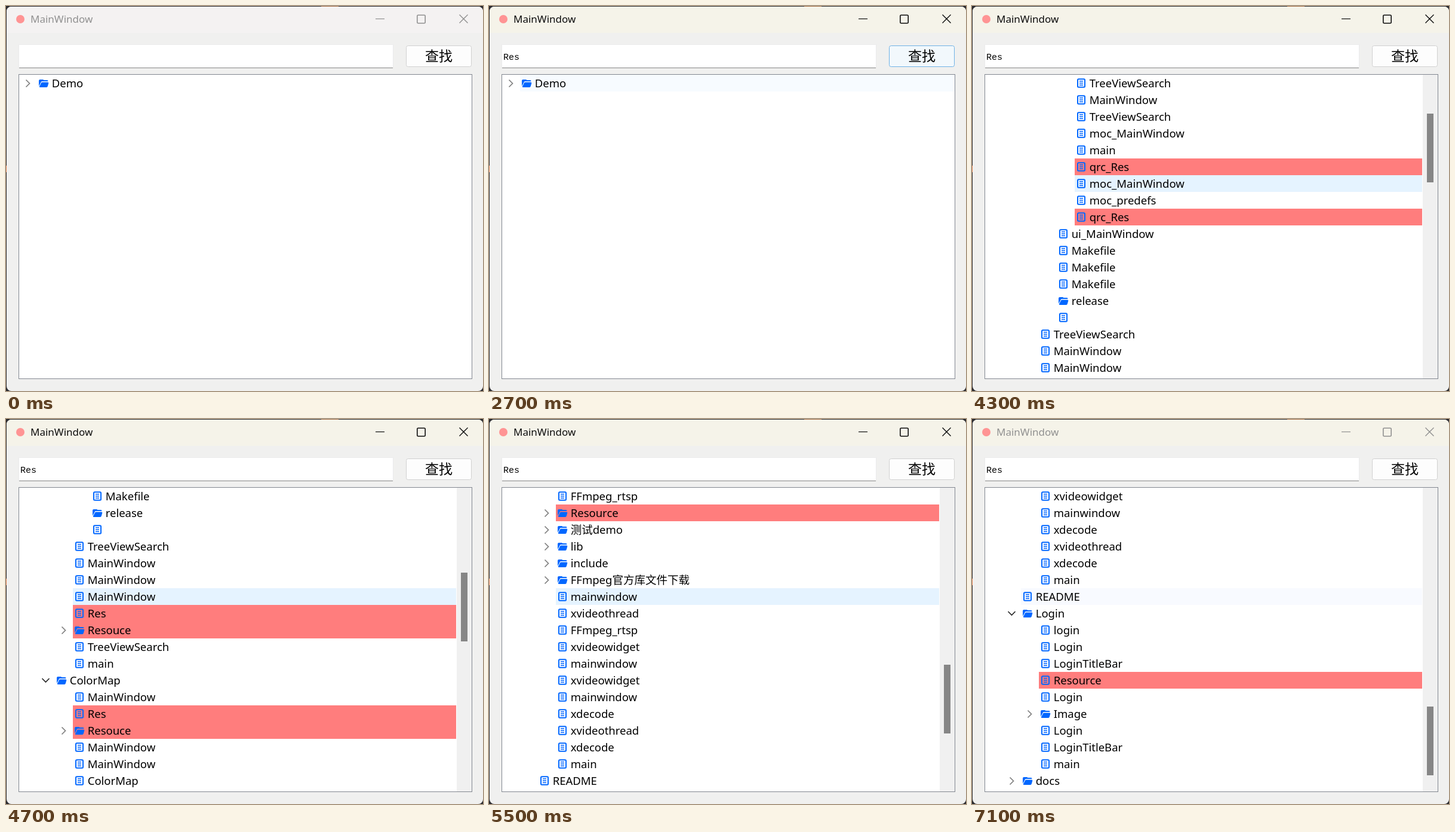
An HTML page that plays this animation: 799 px wide and 644 px high, repeating every 7.2 s.

```html
<!DOCTYPE html>
<html lang="zh">
<head>
<meta charset="utf-8">
<title>MainWindow</title>
<style>
html, body { margin: 0; width: 100%; height: 100%; overflow: hidden; background: #2a2a2e; }
svg { display: block; }
text { white-space: pre; }
.item { font: 18.5px "Noto Sans", "Noto Sans CJK SC", sans-serif; }
.title { font: 17px "Noto Sans", sans-serif; }
.query { font: 15px "Liberation Mono", monospace; }
.find { font: 300 23px "Noto Sans CJK SC", sans-serif; }
</style>
</head>
<body>
<svg id="stage" width="799" height="644" viewBox="0 0 799 644"></svg>
<script>
const LOOP = 7200, ROW = 28, TOP = 115, PAGE = 18;

// depth, kind (v open folder, > closed folder, = plain folder, - file), name
const tree = `0v Demo|1v TreeViewSearch|2v bin|3v debug
4- TreeViewSearch|4- TreeViewSearch|4- TreeViewSearch|4- MainWindow|4- TreeViewSearch
4- moc_MainWindow|4- main|4- qrc_Res|4- moc_MainWindow|4- moc_predefs|4- qrc_Res
3- ui_MainWindow|3- Makefile|3- Makefile|3- Makefile|3= release|3- 
2- TreeViewSearch|2- MainWindow|2- MainWindow|2- MainWindow|2- Res|2> Resouce
2- TreeViewSearch|2- main|1v ColorMap|2- MainWindow|2- Res|2> Resouce
2- MainWindow|2- MainWindow|2- ColorMap|2> CustomPlot|2- main
1v FFmpeg_rtsp|2> bin|2- mainwindow|2- Res|2- FFmpeg_rtsp|2> Resource
2> 测试demo|2> lib|2> include|2> FFmpeg官方库文件下载
2- mainwindow|2- xvideothread|2- FFmpeg_rtsp|2- xvideowidget|2- mainwindow
2- xvideowidget|2- mainwindow|2- xdecode|2- xvideothread|2- xdecode|2- main
1- README|1v Login|2- login|2- Login|2- LoginTitleBar|2- Resource|2- Login
2> Image|2- Login|2- LoginTitleBar|2- main|1> docs`
  .split(/[|\n]/).map(s => ({ depth: +s[0], kind: s[1], name: s.slice(3) }));

// Each track holds [start ms, value] pairs
const tracks = {
  ink: [[0, '#909090'], [500, '#505050'], [600, '#0c0c0c'], [6900, '#505050'], [7000, '#909090']],
  bar: [[0, '#f4f2f2'], [500, '#f5f3e9']],
  query: [[0, ''], [1400, 'R'], [1600, 'Re'], [1800, 'Res']],
  caret: [[0, 0], [500, 1], [1000, 0], [1400, 1], [2400, 0], [2800, 1], [3000, 0]],
  button: [[0, ['#fdfdfd', '#d0d0d0']], [2700, ['#f2f8fc', '#6fb2e6']], [2800, ['#e5f1fb', '#0078d7']],
    [3000, ['#cce4f7', '#005499']], [3200, ['#d4e8f8', '#0067b0']], [3300, ['#e5f1fb', '#0078d7']],
    [4000, ['#f2f8fc', '#8fc2e8']], [4100, ['#fdfdfd', '#d0d0d0']]],
  open: [[0, 0], [3100, 1]],
  scroll: [[0, 0], [4200, 3], [4300, 6], [4400, 12], [4600, 15], [4700, 18], [4800, 21], [4900, 24],
    [5000, 27], [5100, 30], [5200, 33], [5300, 36], [5500, 42], [5600, 48], [5700, 51], [5900, 53]],
  hover: [[0, [0, 'none']], [100, [0, '#f0f8ff']], [200, [0, '#e5f3ff']], [300, [0, '#f7fbff']],
    [4000, [2, '#e5f3ff']], [4100, [6, '#e5f3ff']], [6200, [6, '#f0f8ff']], [6300, [6, '#f8faff']]]
};
const at = (name, t) => tracks[name].findLast(step => step[0] <= t)[1];

const rect = (x, y, w, h, fill, more = '') =>
  `<rect x="${x}" y="${y}" width="${w}" height="${h}" fill="${fill}" ${more}/>`;
const line = (d, color, width) =>
  `<path d="${d}" fill="none" stroke="${color}" stroke-width="${width}"/>`;
const text = (cls, x, y, s, fill = '#000') =>
  `<text class="${cls}" x="${x}" y="${y}" fill="${fill}">${s}</text>`;

const BLUE = '#0067ff';
const folder = `<path fill="${BLUE}" d="M3 19V10q0-2 2-2h5l1.5 1H17q1.5 0 1.5 2H8.5q-1.2 0-1.8 1.3z
  M9 12.5h9q1.6 0 1.3 1.5l-1.4 5q-.5 2-2 2H5q-1.5 0-1-1.5l3-5.9q.6-1.1 2-1.1z"/>`;
const file = rect(5, 7.2, 12, 13.6, 'none', `rx="1.5" stroke="${BLUE}" stroke-width="2"`) +
  line('M8 10.7h6M8 14h6M8 17.3h6', BLUE, 1.6);
const arrows = {
  'v': line('M-21.5 11l6 6 6-6', '#222', 1.6),
  '>': line('M-18.5 8.5l6 6-6 6', '#7c7c7c', 1.6)
};

function row(item, y, right, hover) {
  const x = 52 + 30 * item.depth;
  const fill = item.name.includes('Res') && right < 780 ? '#ff7d7d' : hover;
  return `<g transform="translate(${x} ${y})">` +
    (fill ? rect(0, 0, right - x, ROW, fill) : '') +
    (item.kind === '-' ? file : folder) + (arrows[item.kind] || '') +
    text('item', 24.7, 21, item.name) + '</g>';
}

function treeView(t) {
  const open = at('open', t), scroll = at('scroll', t), [hoverRow, hoverFill] = at('hover', t);
  const items = open ? tree.slice(scroll, scroll + PAGE + 1) : [{ ...tree[0], kind: '>' }];
  const right = open ? 754 : 780;
  let out = rect(21.5, 114.5, 759, 509, '#fff', 'stroke="#828790"') + '<g clip-path="url(#view)">';
  if (open && hoverRow) out += '';
  items.forEach((item, i) => {
    out += row(item, TOP + ROW * i, right, i === hoverRow ? hoverFill : '');
  });
  if (open) {
    const unit = 456 / tree.length;
    out += rect(755, 115, 25, 508, '#f0f0f0') +
      rect(762, Math.round(141 + scroll * unit), 11, 115, '#868686');
  }
  return out + '</g>';
}

function frame(t) {
  const ink = at('ink', t), query = at('query', t), [face, edge] = at('button', t);
  return '<clipPath id="view"><rect x="22" y="115" width="758" height="508"/></clipPath>' +
    '<clipPath id="win"><rect x="1" y="1" width="798" height="643" rx="8"/></clipPath>' +
    rect(0, 0, 799, 644, '#2a2a2e') +
    rect(528, 0, 29, 1, '#a06840') + rect(0, 267, 1, 11, '#e08050') +
    '<g clip-path="url(#win)">' + rect(1, 1, 798, 643, '#f0f0ef') + rect(1, 1, 798, 44, at('bar', t)) + '</g>' +
    '<circle cx="24" cy="22" r="7" fill="#ff9494"/>' +
    text('title', 41, 28, 'MainWindow', ink) +
    line('M619 21.5h15', ink, 1.2) +
    rect(688.8, 15.3, 13.4, 13.4, 'none', `rx="1.5" stroke="${ink}" stroke-width="1.6"`) +
    line('M759.5 14.5l14 14m0-14l-14 14', ink, 1.4) +
    rect(21.5, 64.5, 627, 39, '#fff', 'stroke="#ebebeb"') + line('M22 103.5h626', '#868686', 1) +
    text('query', 24, 90, query) +
    (at('caret', t) ? rect(24 + 9 * query.length, 75, 1, 18, '#000') : '') +
    rect(670.5, 66.5, 109, 35, face, `rx="3" stroke="${edge}"`) +
    text('find', 702, 92, '查找') +
    treeView(t);
}

const stage = document.getElementById('stage');
const start = performance.now();
let shown = -1;
function tick() {
  const t = Math.floor((performance.now() - start) % LOOP / 100) * 100;
  if (t !== shown) stage.innerHTML = frame(shown = t);
  requestAnimationFrame(tick);
}
tick();
</script>
</body>
</html>
```
